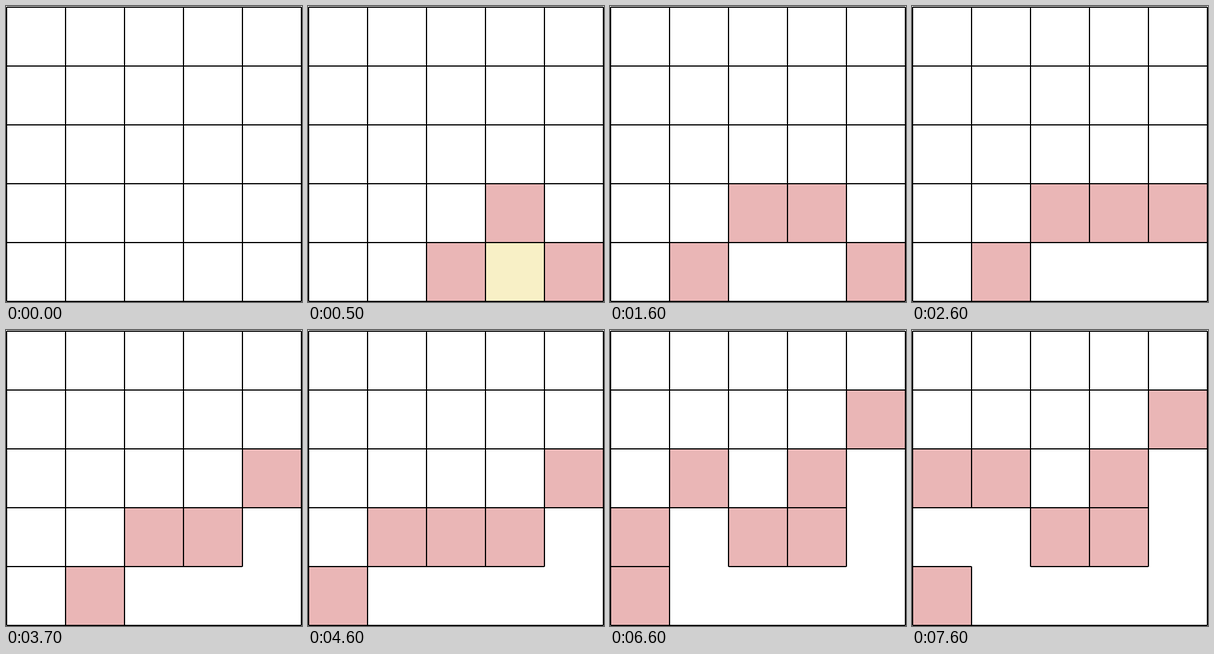
An HTML page with a canvas for the animation above (8000 ms loop, 502 by 503 pixels).

```html
<!DOCTYPE html>
<html lang="en">
<head>
<meta charset="utf-8">
<title>Maze growth</title>
<style>
html, body { margin: 0; width: 100%; height: 100%; overflow: hidden; background: #fff; }
canvas { display: block; }
</style>
</head>
<body>
<canvas id="stage" width="502" height="503"></canvas>
<script>
const ctx = document.getElementById('stage').getContext('2d');
const LOOP = 8000, N = 5, SIZE = 100, LEFT = 1, TOP = 2;
const RED = '#eab6b6', YELLOW = '#f8f0c6';
const DIRS = [[1, 0], [-1, 0], [0, 1], [0, -1]];

// pick: cell turns yellow; open: wall towards (dc, dr) falls and neighbours join the frontier
const steps = [
  { c: 3, r: 4, pick: 500, open: 500, rest: 1000 },
  { c: 2, r: 4, pick: 1000, open: 1600, dc: 1, dr: 0 },
  { c: 4, r: 4, pick: 1900, open: 2600, dc: -1, dr: 0 },
  { c: 4, r: 3, pick: 3000, open: 3700, dc: 0, dr: 1 },
  { c: 1, r: 4, pick: 4100, open: 4600, dc: 1, dr: 0 },
  { c: 4, r: 2, pick: 5100, open: 5600, dc: 0, dr: 1 },
  { c: 1, r: 3, pick: 6100, open: 6600, dc: 0, dr: 1 },
  { c: 0, r: 3, pick: 7100, open: 7600, dc: 1, dr: 0 }
];

const px = c => LEFT + c * SIZE;
const py = r => TOP + r * SIZE;
const key = (c, r) => c + ',' + r;
const inside = (c, r) => c >= 0 && r >= 0 && c < N && r < N;

function mazeAt(t) {
  const fills = new Map(), gaps = new Set();
  for (const s of steps) {
    if (t < s.open) continue;
    for (const [dc, dr] of DIRS) {
      const c = s.c + dc, r = s.r + dr;
      if (inside(c, r)) fills.set(key(c, r), RED);
    }
    if (s.dc) gaps.add('v' + key(Math.max(s.c, s.c + s.dc), s.r));
    if (s.dr) gaps.add('h' + key(s.c, Math.max(s.r, s.r + s.dr)));
  }
  for (const s of steps) {
    if (t < s.pick) continue;
    const k = key(s.c, s.r);
    if (t < (s.rest || s.open)) fills.set(k, YELLOW);
    else fills.delete(k);
  }
  return { fills, gaps };
}

function draw(t) {
  const { fills, gaps } = mazeAt(t);
  ctx.fillStyle = '#fff';
  ctx.fillRect(0, 0, 502, 503);
  for (const [k, color] of fills) {
    const [c, r] = k.split(',').map(Number);
    ctx.fillStyle = color;
    ctx.fillRect(px(c), py(r), SIZE, SIZE);
  }
  ctx.fillStyle = '#000';
  for (let i = 0; i <= N; i++) {
    for (let j = 0; j < N; j++) {
      if (!gaps.has('v' + key(i, j))) ctx.fillRect(px(i) - 1, py(j), 2, SIZE);
      if (!gaps.has('h' + key(j, i))) ctx.fillRect(px(j), py(i) - 1, SIZE, 2);
    }
  }
}

const start = performance.now();
function tick() {
  draw((performance.now() - start) % LOOP);
  requestAnimationFrame(tick);
}
tick();
</script>
</body>
</html>
```
